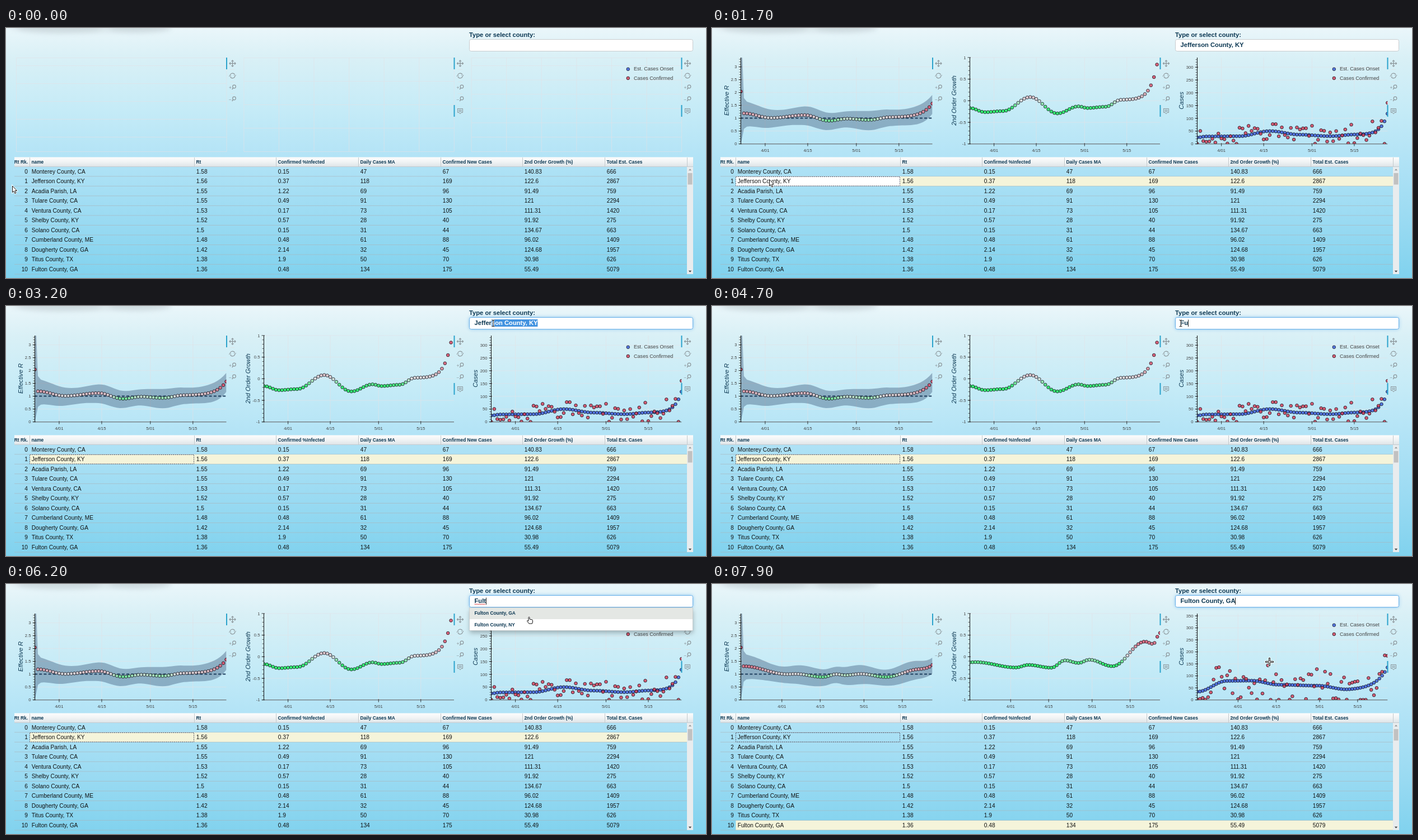
Animation of 1250x448 px, one loop 8000 ms. Source, as an HTML page with a canvas:

```html
<!DOCTYPE html>
<html lang="en">
<head>
<meta charset="utf-8">
<title>County cases</title>
<style>
html, body { margin: 0; width: 100%; height: 100%; overflow: hidden; }
canvas { display: block; width: 1250px; height: 448px; }
</style>
</head>
<body>
<canvas id="stage" width="1250" height="448"></canvas>
<script>
const ctx = document.getElementById('stage').getContext('2d');
const LOOP = 8000, NAVY = '#0c3853', GRAY = '#8d979c', GRID = 'rgba(226,226,230,.65)';
const BLUE = 'rgba(65,100,225,.85)', RED = 'rgba(220,60,85,.8)';
const TOP = 53, BOTTOM = 207.8;
const font = (size, style = '') => `${style} ${size}px "Liberation Sans", Arial, sans-serif`;

// A series eases between its [day, value] turning points and ends in an exponential rise.
function series(last, keys, rise = 0, pace = 1) {
  return d => {
    const i = Math.max(1, keys.findIndex(k => k[0] >= d));
    const [d0, v0] = keys[i - 1], [d1, v1] = keys[i];
    const ease = (1 - Math.cos(Math.PI * (d - d0) / (d1 - d0))) / 2;
    return v0 + (v1 - v0) * ease + rise * Math.exp((d - last) / pace);
  };
}
function random(seed) {
  return () => (seed = (seed * 16807) % 2147483647) / 2147483647;
}
// Daily confirmed counts scatter around the estimated onset.
function scatter(last, onset, seed) {
  const rnd = random(seed);
  return Array.from({ length: last + 1 }, (_, d) => onset(d) * (d === last ? 1.36 : 2.2 * rnd() ** 1.4));
}
function county(days, april, top, unit, seed, rt, growth, onset) {
  const [r, g, o] = [rt, growth, onset].map(s => series(days, ...s));
  return { days, april, top, unit, rt: r, growth: g, onset: o, confirmed: scatter(days, o, seed) };
}
const jefferson = county(63, 8, 300, 0.458, 4021,
  [[[0, 2.04], [1, 1.19], [10, 1.01], [21, 1.12], [29, .9], [35, .98], [42, .93], [49, 1.03], [63, 1.01]], .56, 3.5],
  [[[0, -.17], [5, -.265], [11, -.24], [20, .085], [29, -.295], [36, -.13], [39, -.17], [45, -.14], [50, .015], [63, -.02]], 1.3, 2.4],
  [[[0, 25], [3, 29], [14, 30], [24, 50], [34, 36], [44, 30], [52, 36], [63, 36]], 82, 2.2]);
const fulton = county(70, 15, 350, 0.43, 9177,
  [[[0, 2.04], [1, 1.31], [17, 1], [20, 1.01], [30, .89], [35, 1], [38, .96], [44, 1.01], [53, .89], [65, 1.18], [70, 1.18]], .18, 2],
  [[[0, -.13], [2, -.125], [17, -.25], [21.5, -.19], [30, -.255], [35, -.085], [40, -.145], [44, -.07], [52.5, -.22], [64.5, .35], [67.5, .295], [70, .55]]],
  [[[0, 34], [11, 79], [20, 80], [30, 63], [44, 59], [56, 40], [70, 40]], 95, 4.5]);

const rows = `Monterey County, CA|1.58|0.15|47|67|140.83|666
Jefferson County, KY|1.56|0.37|118|169|122.6|2867
Acadia Parish, LA|1.55|1.22|69|96|91.49|759
Tulare County, CA|1.55|0.49|91|130|121|2294
Ventura County, CA|1.53|0.17|73|105|111.31|1420
Shelby County, KY|1.52|0.57|28|40|91.92|275
Solano County, CA|1.5|0.15|31|44|134.67|663
Cumberland County, ME|1.48|0.48|61|88|96.02|1409
Dougherty County, GA|1.42|2.14|32|45|124.68|1957
Titus County, TX|1.38|1.9|50|70|30.98|626
Fulton County, GA|1.36|0.48|134|175|55.49|5079`.split('\n').map(r => r.split('|'));
const heads = ['name', 'Rt', 'Confirmed %Infected', 'Daily Cases MA', 'Confirmed New Cases', '2nd Order Growth (%)', 'Total Est. Cases'];
const colX = i => i ? Math.floor(336 + 146.7 * (i - 1)) : 42;

// Pointer moves: start, end, x, y, shape.
const moves = [
  [0, 0, 11.5, 283, 'arrow'], [600, 600, 20.5, 281.5, 'arrow'], [800, 800, 102.5, 271.5, 'arrow'],
  [2000, 2300, 837, 88, 'arrow'], [2400, 2700, 1006, 38, 'beam'], [2800, 2900, 952, 31, 'beam'],
  [2900, 3200, 870, 31, 'beam'], [3300, 4000, 837, 31, 'beam'], [5500, 5500, 992.5, 11.5, 'none'],
  [5800, 5800, 992.5, 11.5, 'arrow'], [5900, 6200, 930, 58, 'hand'], [6700, 6700, 933, 60, 'cross'],
  [7500, 7600, 948, 90, 'cross'], [7700, 7900, 995.5, 139.5, 'cross']
];
const typed = [[0, ''], [1700, rows[1][0]], [4500, 'F'], [4700, 'Fu'], [4900, 'Ful'], [5500, 'Fult'], [6700, rows[10][0]]];

function pointer(t) {
  const now = Math.floor(t / 100) * 100;
  const i = moves.findLastIndex(m => m[0] <= now);
  const [start, end, x, y, shape] = moves[i];
  const k = end > start ? Math.min(1, (now - start) / (end - start)) : 1;
  const [, , fromX, fromY] = moves[Math.max(0, i - 1)];
  return { x: fromX + (x - fromX) * k, y: fromY + (y - fromY) * k, shape: k ? shape : moves[i - 1][4] };
}

function text(s, x, y, f, color, align = 'left') {
  ctx.font = f; ctx.fillStyle = color; ctx.textAlign = align;
  ctx.fillText(s, x, y);
}
function line(points, color, width = 1) {
  ctx.beginPath();
  for (let i = 0; i < points.length; i += 2) ctx.lineTo(points[i], points[i + 1]);
  ctx.strokeStyle = color; ctx.lineWidth = width; ctx.stroke();
}
function box(x, y, w, h, color) { ctx.fillStyle = color; ctx.fillRect(x, y, w, h); }
function vertical(y0, y1, stops) {
  const g = ctx.createLinearGradient(0, y0, 0, y1);
  stops.forEach(([p, c]) => g.addColorStop(p, c));
  return g;
}
function dot(x, y, color) {
  ctx.beginPath(); ctx.arc(x, y, 2.8, 0, 7);
  ctx.fillStyle = color; ctx.fill();
  ctx.strokeStyle = 'rgba(10,10,20,.85)'; ctx.lineWidth = 0.9; ctx.stroke();
}
function heat(v) {
  const end = v > 0 ? [222, 84, 110] : [40, 245, 105];
  const k = Math.min(1, v > 0 ? v / 0.4 : -v / 0.17);
  return `rgba(${[224, 226, 226].map((c, i) => Math.round(c + k * (end[i] - c)))},.9)`;
}
function turned(x, y, angle, paint) {
  ctx.save(); ctx.translate(x, y); ctx.rotate(angle); paint(); ctx.restore();
}

function background() {
  box(0, 0, 1250, 448, vertical(0, 448, [[0, '#eaf6fa'], [.12, '#d9f0f6'], [.33, '#c5ebf7'], [.52, '#b2e3f6'], [.78, '#99daf2'], [1, '#80d2ee']]));
  ctx.save();
  ctx.filter = 'blur(4px)';
  ctx.fillStyle = 'rgba(135,150,155,.15)';
  for (const [x, w, h] of [[150, 145, 8], [95, 75, 10], [240, 55, 9]]) {
    ctx.beginPath(); ctx.ellipse(x, 0, w, h, 0, 0, 7); ctx.fill();
  }
  ctx.restore();
}

function emptyCharts() {
  const gaps = [[67.5, 32], [95.5, 42], [67.5, 25.6]];
  gaps.forEach(([first, gap], n) => {
    const x = 18.5 + 406.3 * n, r = x + 375.5;
    line([x, 53.5, r, 53.5, r, 221.5, x, 221.5, x, 53.5], GRID);
    for (let y = first; y < 200; y += gap) line([x, y, r, y], GRID);
    if (n) for (let i = 1; i < 6; i++) line([x + i * 62.6, 53, x + i * 62.6, 221], GRID);
  });
}

// Grid, axes and labels around a plot; plot gets the scales for day and value.
function chart(c, x0, x1, title, titleX, top, step, unit, zero, bottom, plot) {
  const xOf = d => x0 + d * (x1 - x0) / c.days, yOf = v => zero - v * unit;
  const labels = [];
  for (let v = top; v >= bottom; v -= step) labels.push(v);
  const dates = ['4/01', '4/15', '5/01', '5/15'].map((s, i) => [s, xOf(c.april + [0, 14, 30, 44][i])]);
  labels.forEach(v => line([x0, yOf(v), x1, yOf(v)], GRID));
  dates.forEach(([, x]) => line([x, TOP, x, BOTTOM], GRID));
  ctx.save();
  ctx.beginPath(); ctx.rect(x0, TOP, x1 - x0, BOTTOM - TOP); ctx.clip();
  plot(xOf, yOf);
  ctx.restore();
  line([x0, TOP, x0, BOTTOM], '#111');
  line([x0, BOTTOM, x1, BOTTOM], '#333', .8);
  for (let y = BOTTOM; y >= TOP; y -= step * unit / 5) line([x0 - 3, y, x0, y], '#222', .7);
  labels.forEach(v => {
    line([x0 - 4, yOf(v), x0 + 1.5, yOf(v)], '#111', .8);
    text(v, x0 - 7, yOf(v) + 2.7, font(7.7), '#444', 'right');
  });
  dates.forEach(([s, x]) => {
    line([x, BOTTOM - 1.5, x, BOTTOM + 4], '#111', .8);
    text(s, x, 221.5, font(7.7), '#444', 'center');
  });
  turned(titleX, 130, -Math.PI / 2, () => text(title, 0, 0, font(11.2, 'italic'), NAVY, 'center'));
}

function charts(c) {
  const days = Array.from({ length: c.days + 1 }, (_, d) => d);
  chart(c, 51.5, 393.5, 'Effective R', 29.5, 3, .5, 46, 207.6, 0, (xOf, yOf) => {
    // The interval is very wide on the first day and settles quickly.
    const edge = (d, side, base, spike) =>
      yOf(c.rt(d)) + side * (base + 9 * Math.exp(-d / 4) + spike * Math.exp(-3 * d) + 1.5 * Math.sin(d / 3));
    ctx.beginPath();
    days.forEach(d => ctx.lineTo(xOf(d), edge(d, -1, 14.5, 110)));
    days.reverse().forEach(d => ctx.lineTo(xOf(d), edge(d, 1, 17, 70)));
    days.reverse();
    ctx.fillStyle = 'rgba(62,92,125,.42)'; ctx.fill();
    ctx.setLineDash([5, 3.2]);
    line([51, yOf(1), 394, yOf(1)], '#1c3f5e', 2);
    ctx.setLineDash([]);
    days.forEach(d => dot(xOf(d), yOf(c.rt(d)), heat(c.rt(d) - 1)));
  });
  chart(c, 460.5, 800, '2nd Order Growth', 436, 1, .5, 77.4, 130.3, -1, (xOf, yOf) => {
    days.forEach(d => dot(xOf(d), yOf(c.growth(d)), heat(c.growth(d))));
  });
  chart(c, 866.5, 1206.3, 'Cases', 842, c.top, 50, c.unit, 207.6, 0, (xOf, yOf) => {
    days.forEach(d => dot(xOf(d), yOf(c.onset(d)), BLUE));
    days.forEach(d => dot(xOf(d), yOf(c.confirmed[d]), RED));
  });
}

function lens(x, y, sign) {
  text(sign, x - 6.5, y + 4, font(8.5), GRAY);
  ctx.beginPath(); ctx.arc(x + 3, y - 1, 2.8, 0, 7);
  ctx.strokeStyle = GRAY; ctx.lineWidth = 1.2; ctx.stroke();
  line([x + 1.2, y + 1.2, x - .8, y + 4], GRAY, 1.4);
}
function toolbar(x, hover) {
  line([x - 10.5, 53, x - 10.5, 74], '#2ba3cc', 2);
  [74.5, 96.5, 117.5].forEach(y => line([x - 4, y, x + 4, y], 'rgba(225,225,225,.6)'));
  for (let i = 0; i < 4; i++) {
    turned(x, 63.5, i * Math.PI / 2, () => {
      line([0, 0, 0, -5], GRAY, 1.3);
      line([-2, -3.6, 0, -5.6, 2, -3.6], GRAY, 1.1);
    });
  }
  for (const half of [0, Math.PI]) {
    turned(x, 85.5, half, () => {
      ctx.beginPath(); ctx.arc(0, 0, 4.4, .35, 2.75);
      ctx.strokeStyle = GRAY; ctx.lineWidth = 1.2; ctx.stroke();
      line([2.4, -.9, 4.6, 1.1, 6, -1.5], GRAY);
    });
  }
  lens(x, 106, '+');
  lens(x, 127, '−');
  if (!hover) return;
  line([x - 10.5, 138, x - 10.5, 159], '#2ba3cc', 2);
  line([x - 4.5, 144.5, x + 4.5, 144.5, x + 4.5, 151.5, x + 2, 151.5, x, 154, x - 2, 151.5, x - 4.5, 151.5, x - 4.5, 144], GRAY);
  [146.7, 148.3, 149.9].forEach(y => line([x - 3, y, x + 3, y], GRAY, .8));
}
function legend() {
  [['Est. Cases Onset', BLUE], ['Cases Confirmed', RED]].forEach(([s, color], i) => {
    dot(1110.8, 73.7 + i * 16.2, color);
    text(s, 1121, 76.3 + i * 16.2, font(9.1), '#444');
  });
}

function table(t) {
  box(15, 231.5, 1212, 17, vertical(231, 248, [[0, '#fdfdfd'], [.5, '#f1f4f5'], [1, '#dfe5e8']]));
  line([15, 248.5, 1227, 248.5], '#c3cbd0');
  for (let i = 0; i < 8; i++) line([colX(i) + .5, 232, colX(i) + .5, 248], '#c3c9cc');
  text('Rt Rk.', 39, 242.8, font(8.4, 'bold'), NAVY, 'right');
  heads.forEach((s, i) => text(s, colX(i) + 3.4, 242.8, font(8.4, 'bold'), NAVY));
  const chosen = t < 1700 ? -1 : t < 6700 ? 1 : 10;
  rows.forEach((row, i) => {
    const y = 248.6 + i * 17.53;
    if (i === chosen) box(42.5, y, 1173.5, 17, '#f5f4da');
    if (i === 1 && t >= 600 && t < 2100) box(42.5, y, 293.5, 17, '#fff');
    line([15, y + 17.2, 1216, y + 17.2], 'rgba(170,178,184,.6)');
    text(i, 39, y + 12, font(10.15), '#111', 'right');
    row.forEach((s, k) => text(s, colX(k) + 3.8, y + 12, font(10.15), '#111'));
  });
  if (t >= 1700) {
    ctx.setLineDash([2, 1.5]);
    ctx.strokeStyle = '#556'; ctx.lineWidth = 1;
    ctx.strokeRect(42.5, 266.5, 293, 16.5);
    ctx.setLineDash([]);
  }
  box(1216, 249, 11, 192, '#e8ecee');
  box(1217.5, 260, 8, 20.5, '#c1c1c1');
  triangle(1221.5, 254, -1, '#9a9a9a');
  triangle(1221.5, 436, 1, '#404040');
}
function triangle(x, y, dir, color) {
  ctx.beginPath();
  ctx.moveTo(x - 2.7, y - dir * 1.3); ctx.lineTo(x + 2.7, y - dir * 1.3); ctx.lineTo(x, y + dir * 1.7);
  ctx.fillStyle = color; ctx.fill();
}

function field(t) {
  const bold = font(11.2, 'bold'), focus = t >= 2900, left = 836.5, base = 34.2;
  const value = typed.findLast(e => e[0] <= t)[1];
  text('Type or select county:', 827, 15.9, bold, NAVY);
  ctx.save();
  ctx.beginPath(); ctx.roundRect(827.5, 20.5, 399, 21, 3);
  if (focus) { ctx.shadowColor = 'rgba(102,175,233,.75)'; ctx.shadowBlur = 6; }
  ctx.fillStyle = '#fff'; ctx.fill();
  ctx.restore();
  ctx.strokeStyle = focus ? '#66afe9' : '#c8cccf'; ctx.lineWidth = 1; ctx.stroke();
  text(value, left, base, bold, NAVY);
  const edge = n => left + ctx.measureText(value.slice(0, n)).width;
  const end = edge(value.length);
  if (t >= 3000 && t < 4500) {
    // The selection runs from the letter gap nearest the pointer to the end.
    const { x } = pointer(t);
    let n = 0;
    while (n < value.length && (edge(n) + edge(n + 1)) / 2 < x) n++;
    box(edge(n), 24, end - edge(n), 13, '#4393e0');
    text(value.slice(n), edge(n), base, bold, '#fff');
  } else if (focus && !(t >= 7400 && t < 7900)) {
    box(Math.round(end - .5), 24.5, 1, 12.5, '#222');
  }
  if (t >= 6000 && t < 6700) {
    const wave = [];
    for (let x = left; x <= end; x += 1.5) wave.push(x, 36.3 + (wave.length % 4 ? .6 : -.6));
    line(wave, '#e03030', .9);
  }
}
function menu(t) {
  ctx.save();
  ctx.shadowColor = 'rgba(0,0,0,.25)'; ctx.shadowBlur = 8; ctx.shadowOffsetY = 4;
  box(827.5, 42.5, 399, 41, '#fff');
  ctx.restore();
  if (t >= 5500) box(827.5, 42.5, 399, 20.5, '#e4e7e4');
  ctx.strokeStyle = 'rgba(0,0,0,.15)'; ctx.lineWidth = .8;
  ctx.strokeRect(827.5, 42.5, 399, 41);
  ['GA', 'NY'].forEach((s, i) => text('Fulton County, ' + s, 836.5, 55.3 + i * 20.5, font(8.4, 'bold'), NAVY));
}

const shapes = {
  arrow: 'M0 0V11.5L2.6 9.2L4.4 13.5L6.4 12.6L4.6 8.5H8Z',
  cross: 'M-1-7H1V-1H7V1H1V7H-1V1H-7V-1H-1Z',
  hand: 'M3 1.5Q4-.5 5 1.5V5L9 5.8Q10.5 6 10.5 7.5V10L9.5 13H4L.5 8.5Q.5 7 2 7.5L3 8.5Z',
  beam: 'M-2.5-6L0-5.2L2.5-6M0-5.5V5.5M-2.5 6L0 5.2L2.5 6',
  none: ''
};
function cursor({ x, y, shape }) {
  const p = new Path2D(shapes[shape]);
  ctx.save();
  ctx.translate(x, y);
  ctx.strokeStyle = '#fff'; ctx.lineWidth = 2.4; ctx.stroke(p);
  if (shape !== 'beam') { ctx.fillStyle = '#fff'; ctx.fill(p); }
  ctx.strokeStyle = '#111'; ctx.lineWidth = 1; ctx.stroke(p);
  ctx.restore();
}

function draw(t) {
  background();
  if (t < 1700) emptyCharts(); else charts(t < 6700 ? jefferson : fulton);
  legend();
  toolbar(404.5, false); toolbar(811, true); toolbar(1217, true);
  table(t);
  field(t);
  if (t >= 5000 && t < 6700) menu(t);
  cursor(pointer(t));
}

const start = performance.now();
function tick() {
  draw((performance.now() - start) % LOOP);
  requestAnimationFrame(tick);
}
tick();
</script>
</body>
</html>
```
